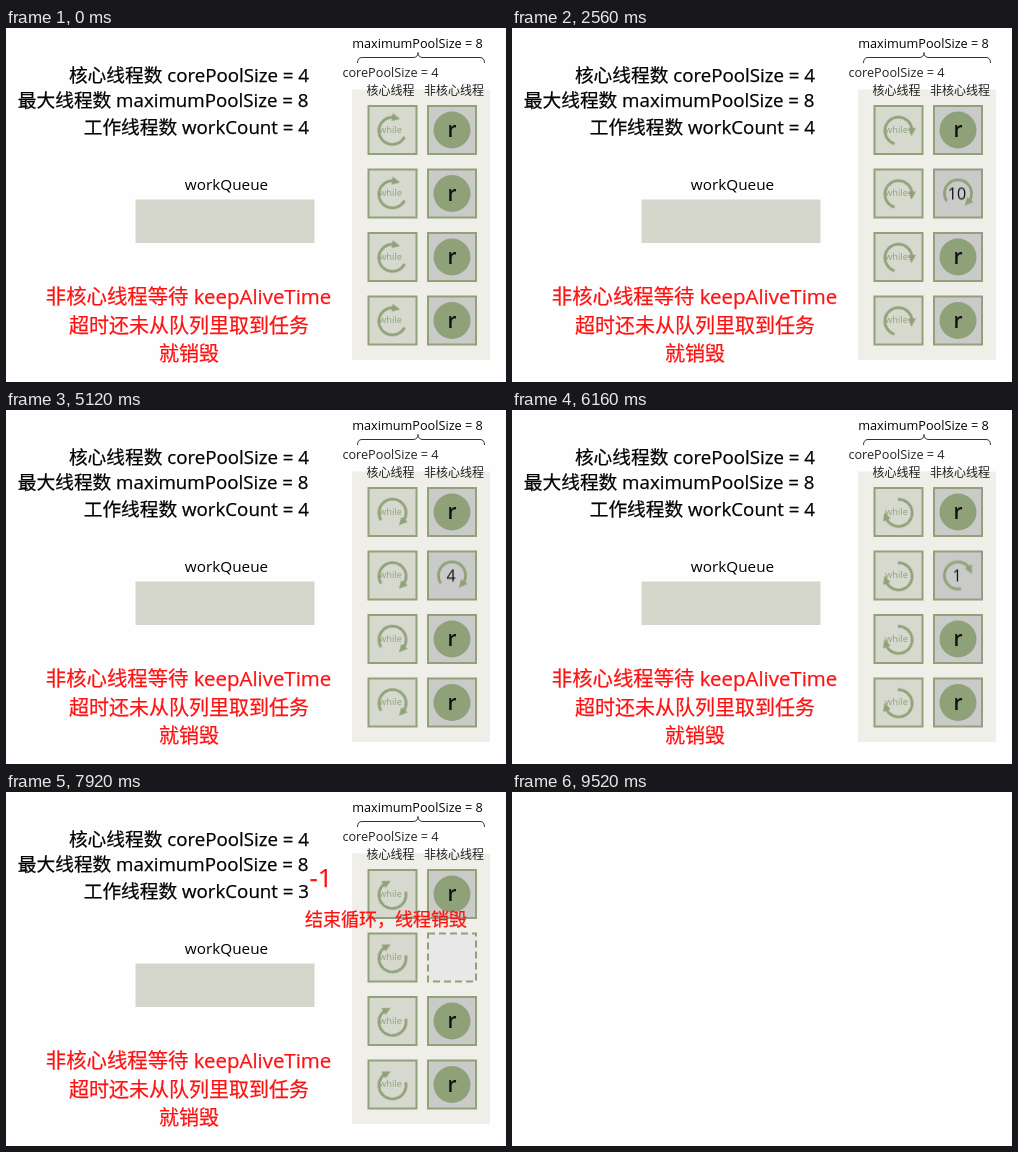
An HTML page for the animation above (9600 ms loop, 500x354 px).

```html
<!DOCTYPE html>
<html lang="zh-CN">
<head>
<meta charset="utf-8">
<title>Thread pool keepAliveTime</title>
<style>
  html, body { margin: 0; width: 100%; height: 100%; overflow: hidden; background: #fefefe; }
  svg { display: block; width: 500px; height: 354px; font-family: "Open Sans", "Noto Sans", "Noto Sans CJK SC", "Noto Sans CJK", sans-serif; }
  .mid { text-anchor: middle; }
  .head { font-size: 18.7px; text-anchor: end; fill: #000; stroke: #000; stroke-width: .25; }
  .label { font-size: 12.7px; fill: #222; }
  .cjk { font-size: 12px; }
  .red { fill: #ff1212; stroke: #ff1212; stroke-width: .25; }
  .note { font-size: 20px; }
  .cell { stroke: #8fa279; stroke-width: 2; }
  .core { fill: #d8d9ce; }
  .extra { fill: #cacac8; }
  .empty { fill: #e8e8e8; stroke-dasharray: 7 4; }
  .while { font-size: 9.3px; fill: #8fa279; }
  .task { font-size: 21px; font-weight: 600; fill: #111; }
  .num { font-size: 16px; fill: #111; }
  .green { fill: #8fa179; }
  .arc { fill: none; stroke: #8fa179; stroke-width: 2.7; }

  #stage { animation: leave 9.6s linear infinite; }
  .spin { animation: spin .8s steps(10, jump-none) -.56s infinite; }
  .timer { animation: timer 9.6s steps(120) infinite; }
  .finished { animation: finish 9.6s linear infinite; }
  .waiting { animation: wait 9.6s linear infinite; }
  .before { animation: before 9.6s step-end infinite; }
  .after { animation: after 9.6s step-end infinite; }
  .num { opacity: 0; animation: count 9.6s step-end infinite; }
  .minus { animation: rise 9.6s linear infinite, minus 9.6s linear infinite; }
  .ended { animation: drift 9.6s linear infinite, ended 9.6s linear infinite; }

  @keyframes leave { 0%, 94.17% { opacity: 1 } 99.17%, 100% { opacity: 0 } }
  @keyframes spin { from { transform: rotate(142deg) } to { transform: rotate(502deg) } }
  @keyframes timer { from { transform: rotate(180deg) } to { transform: rotate(2880deg) } }
  @keyframes finish { 0%, 20% { opacity: 1 } 25%, 100% { opacity: 0 } }
  @keyframes wait { 0%, 25% { opacity: 0 } 26.6%, 67.49% { opacity: 1 } 67.5%, 100% { opacity: 0 } }
  @keyframes before { 0% { opacity: 1 } 67.5%, 100% { opacity: 0 } }
  @keyframes after { 0% { opacity: 0 } 67.5%, 100% { opacity: 1 } }
  @keyframes count { 0% { opacity: 1 } 4.1667%, 100% { opacity: 0 } }
  @keyframes rise {
    0%, 67.5% { transform: translate(-2.8px, 3.2px) }
    95.83%, 100% { transform: translate(9.1px, -10.4px) }
  }
  @keyframes drift {
    0%, 67.5% { transform: translate(5.2px, 5.6px) }
    95.83%, 100% { transform: translate(-16.9px, -18.2px) }
  }
  @keyframes minus { 0%, 67.5% { opacity: 0 } 70%, 83.33% { opacity: 1 } 92.5%, 100% { opacity: 0 } }
  @keyframes ended { 0%, 67.5% { opacity: 0 } 70%, 85.83% { opacity: 1 } 95.83%, 100% { opacity: 0 } }
</style>
</head>
<body>
<svg viewBox="0 0 500 354">
  <g id="stage">
    <text class="head" x="303" y="53.5">核心线程数 corePoolSize = 4</text>
    <text class="head" x="302.5" y="79">最大线程数 maximumPoolSize = 8</text>
    <text class="head before" x="303" y="105.5">工作线程数 workCount = 4</text>
    <text class="head after" x="303" y="105.5">工作线程数 workCount = 3</text>

    <text class="mid" x="220.5" y="162" font-size="15.3">workQueue</text>
    <rect x="129.5" y="171.5" width="179" height="43.5" fill="#d5d6cb"/>

    <g class="red note mid">
      <text x="182.5" y="276" font-size="20.4">非核心线程等待 keepAliveTime</text>
      <text x="183" y="304.5">超时还未从队列里取到任务</text>
      <text x="183" y="333">就销毁</text>
    </g>

    <rect x="346" y="61.5" width="138" height="270.5" fill="#efeee8"/>
    <path d="M351.5 35Q351.5 29.5 356 29.5H407Q412 29.5 412 24.5Q412 29.5 417 29.5H474Q478.5 29.5 478.5 35" fill="none" stroke="#333"/>
    <g class="label mid">
      <text x="411.5" y="20" fill="#000">maximumPoolSize = 8</text>
      <text x="384.5" y="49">corePoolSize = 4</text>
      <text class="cjk" x="384.5" y="66.5">核心线程</text>
      <text class="cjk" x="448" y="66.5">非核心线程</text>
    </g>
    <g id="cells"></g>

    <text class="red minus" x="300" y="99.5" font-size="26">-1</text>
    <text class="red ended" x="305.5" y="141.5" font-size="18">结束循环，线程销毁</text>
  </g>
</svg>
<script>
  const RADIUS = 13.6, HALF_GAP = 55;

  const at = (x, y, body) => `<g transform="translate(${x} ${y})">${body}</g>`;
  const box = kind => `<rect class="cell ${kind}" x="-24" y="-24" width="48" height="48"/>`;
  const task = '<circle class="green" r="18.5"/><text class="task mid" y="7">r</text>';

  // Clockwise arrow whose gap is centred at the top.
  function ring(motion) {
    const a = HALF_GAP * Math.PI / 180;
    const x = RADIUS * Math.sin(a), y = -RADIUS * Math.cos(a);
    return `<g class="${motion}">
      <path class="arc" d="M${x} ${y}A${RADIUS} ${RADIUS} 0 1 1 ${-x} ${y}"/>
      <path class="green" transform="rotate(${-HALF_GAP})" d="M-2 ${-RADIUS - 4}L6 ${-RADIUS + 1}L-2 ${-RADIUS + 4}Z"/>
    </g>`;
  }

  const numbers = Array.from({ length: 10 }, (_, i) =>
    `<text class="num mid" x="-1" y="5.5" style="animation-delay:${2400 + 400 * i}ms">${10 - i}</text>`).join('');

  const expiring =
    `<g class="before">${box('extra')}</g><g class="after">${box('empty')}</g>` +
    `<g class="finished">${task}</g><g class="waiting">${ring('timer')}${numbers}</g>`;

  const coreCell = box('core') + at(0, .8, ring('spin')) + '<text class="while mid" x="-2" y="2.8">while</text>';

  document.getElementById('cells').innerHTML = [0, 1, 2, 3].map(row => {
    const y = 102 + 63.5 * row;
    return at(386.5, y, coreCell) + at(446, y, row === 1 ? expiring : box('extra') + task);
  }).join('');
</script>
</body>
</html>
```
